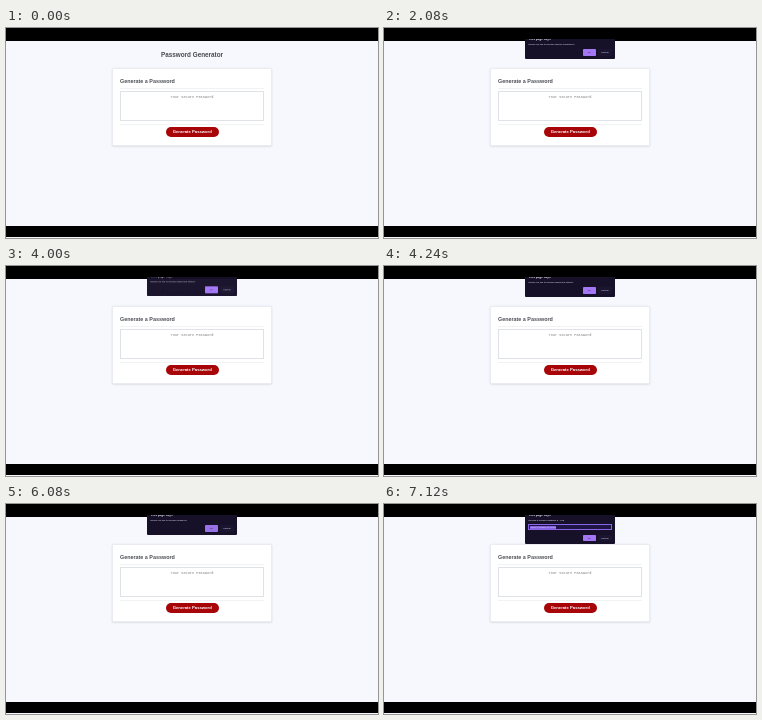
These frames come from a looping animation (372x210 px, 8 s). An HTML page:

```html
<!DOCTYPE html>
<html lang="en">
<head>
<meta charset="utf-8">
<title>Password Generator</title>
<style>
  html, body { margin: 0; width: 100%; height: 100%; overflow: hidden; }
  body { background: #f7f8fd; }
  .stage {
    position: relative; width: 372px; height: 210px; overflow: hidden;
    font-family: "Liberation Sans", Arial, sans-serif;
  }
  .stage * { position: absolute; box-sizing: border-box; margin: 0; white-space: nowrap; }

  .bar { left: 0; width: 372px; background: #000; }
  .bar.top { top: 0; height: 13px; }
  .bar.bottom { top: 198px; height: 11.3px; }

  h1 { left: 0; width: 372px; top: 23px; font: bold 6.35px/8px "Liberation Sans", Arial, sans-serif; color: #464a52; text-align: center; }
  .card {
    left: 106px; top: 39.5px; width: 160px; height: 78.5px; border-radius: 1.5px;
    background: #fff; border: .5px solid #e9ecf1; box-shadow: 0 .5px 2px #00000024;
  }
  h2 { left: 114px; top: 49px; font: bold 5.4px/8px "Liberation Sans", Arial, sans-serif; color: #4b4e54; }
  .rule { left: 114px; width: 144px; height: .6px; background: #f0f2f4; }
  .field {
    left: 114px; top: 63px; width: 144px; height: 30px; border: 1px solid #dfe3e8;
    font: 3.58px/4px "Liberation Mono", "Courier New", monospace; color: #777;
    text-align: center; padding-top: 3px;
  }
  .make {
    left: 160px; top: 98.6px; width: 52.5px; height: 10px; border-radius: 5px;
    background: #a70508; color: #fff; font-size: 4.2px; font-weight: bold;
    line-height: 10px; text-align: center;
  }

  .crop { left: 141px; top: 11px; width: 90px; height: 31px; overflow: hidden; }
  .dialog {
    left: 0; top: -8px; width: 90px; height: 27.8px; border-radius: 0 0 1px 1px;
    background: #161029; color: #f1eefb; font-size: 2.35px; line-height: 3px;
    opacity: 0; animation: 8s step-end infinite;
  }
  .dialog.tall { height: 37.4px; }
  .says { left: 3.5px; top: 7px; font-size: 3.1px; font-weight: bold; }
  .ask { left: 3.2px; top: 11.6px; }
  .ok, .cancel { bottom: 3px; height: 6.6px; line-height: 6.6px; border-radius: .8px; text-align: center; }
  .ok { left: 57.6px; width: 13.8px; background: #a477f6; color: #33205f; animation: 8s step-end infinite; }
  .cancel { left: 73px; width: 13.8px; background: #1b1532; }
  .input { left: 3px; top: 16.5px; width: 84px; height: 6.6px; border: .7px solid #8a63e6; background: #1d1645; }
  .input span { left: 1.4px; top: 1px; height: 3.4px; line-height: 3.4px; width: 26px; background: #8663df; color: #ddd0ff; }

  .a { animation-name: a; }
  .b { animation-name: b; }
  .c { animation-name: c; }
  .d { animation-name: d; }
  .e { animation-name: e; }
  .a .ok { animation-name: hoverA; }
  .c .ok { animation-name: hoverC; }
  .d .ok { animation-name: hoverD; }

  /* One percent is 80 ms */
  @keyframes a {
    0% { opacity: 0; }
    10% { opacity: .38; transform: translateY(-2.4px); }
    11% { opacity: .85; transform: translateY(-1.5px); }
    12% { opacity: .98; transform: translateY(-.7px); }
    13% { opacity: 1; transform: none; }
    33%, 100% { opacity: 0; }
  }
  @keyframes b {
    0% { opacity: 0; }
    33% { opacity: .38; transform: translateY(-2.4px); }
    34% { opacity: .85; transform: translateY(-1.5px); }
    35% { opacity: .98; transform: translateY(-.7px); }
    36% { opacity: 1; transform: none; }
    50%, 100% { opacity: 0; }
  }
  @keyframes c {
    0% { opacity: 0; }
    50% { opacity: .98; transform: translateY(-.7px); }
    51% { opacity: 1; transform: none; }
    64%, 100% { opacity: 0; }
  }
  @keyframes d {
    0% { opacity: 0; }
    64% { opacity: .38; transform: translateY(-2.4px); }
    65% { opacity: .85; transform: translateY(-1.5px); }
    66% { opacity: .98; transform: translateY(-.7px); }
    67% { opacity: 1; transform: none; }
    78%, 100% { opacity: 0; }
  }
  @keyframes e {
    0% { opacity: 0; }
    78% { opacity: .38; transform: translateY(-2.4px); }
    79% { opacity: .85; transform: translateY(-1.5px); }
    80% { opacity: .98; transform: translateY(-.7px); }
    81%, 100% { opacity: 1; transform: none; }
  }
  @keyframes hoverA { 29%, 100% { background: #9672e6; } }
  @keyframes hoverC { 63%, 100% { background: #9672e6; } }
  @keyframes hoverD { 76%, 100% { background: #9672e6; } }
</style>
</head>
<body>
<div class="stage">
  <div class="bar top"></div>
  <div class="bar bottom"></div>
  <h1>Password Generator</h1>
  <div class="card"></div>
  <h2>Generate a Password</h2>
  <div class="rule" style="top:60px"></div>
  <div class="field" style="white-space:nowrap">Your Secure Password</div>
  <div class="rule" style="top:95.6px"></div>
  <div class="make">Generate Password</div>

  <div class="crop">
    <div class="dialog a">
      <b class="says">This page says</b>
      <span class="ask">Would you like to include special characters?</span>
      <span class="ok">OK</span><span class="cancel">Cancel</span>
    </div>
    <div class="dialog b">
      <b class="says">This page says</b>
      <span class="ask">Would you like to include uppercase letters?</span>
      <span class="ok">OK</span><span class="cancel">Cancel</span>
    </div>
    <div class="dialog c">
      <b class="says">This page says</b>
      <span class="ask">Would you like to include lowercase letters?</span>
      <span class="ok">OK</span><span class="cancel">Cancel</span>
    </div>
    <div class="dialog d">
      <b class="says">This page says</b>
      <span class="ask">Would you like to include numbers?</span>
      <span class="ok">OK</span><span class="cancel">Cancel</span>
    </div>
    <div class="dialog tall e">
      <b class="says">This page says</b>
      <span class="ask">Choose a number between 8 - 128</span>
      <div class="input"><span>Enter a number of letters</span></div>
      <span class="ok">OK</span><span class="cancel">Cancel</span>
    </div>
  </div>
</div>
</body>
</html>
```
